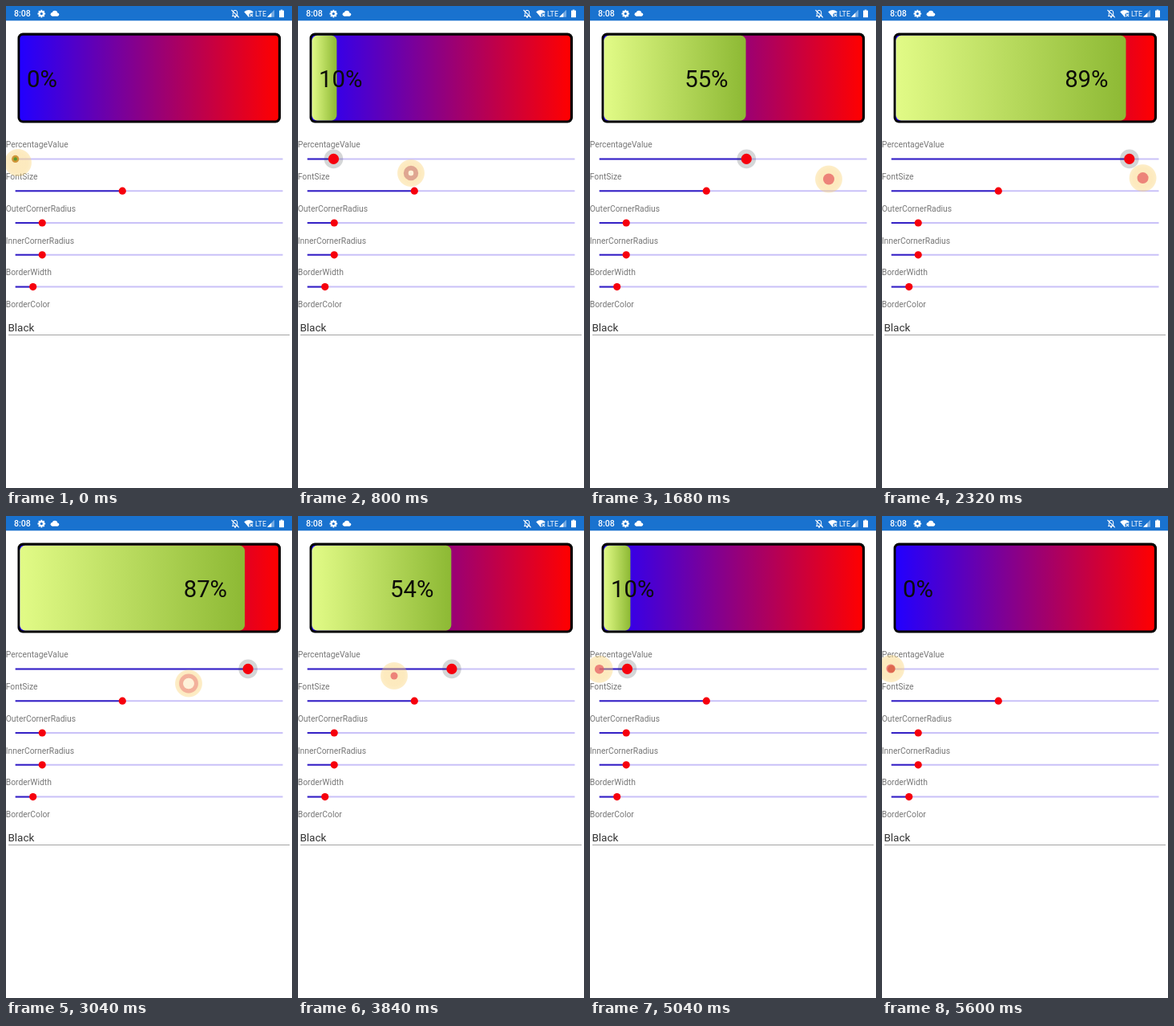
An HTML page with a canvas for the animation above (5680 ms loop, 357x600 px).

```html
<!DOCTYPE html>
<html lang="en">
<head>
<meta charset="utf-8">
<title>Progress bar demo</title>
<style>
html, body { margin: 0; width: 100%; height: 100%; overflow: hidden; background: #fff; }
canvas { display: block; width: 357px; height: 600px; }
</style>
</head>
<body>
<canvas id="stage" width="357" height="600"></canvas>
<script>
const ctx = document.getElementById('stage').getContext('2d');
const LOOP = 5680, STEP = 80, PULSE = 570;
const TRACK = { left: 11.7, right: 345.5 };
const FONT = 'Roboto, sans-serif';

// Keys: [time, value, ...]
const percentKeys = [[0, 0], [560, 0], [800, 9.8], [1360, 38.5], [1680, 55], [2240, 85],
  [2480, 97], [2600, 100], [2700, 100], [3040, 87], [3840, 54], [4560, 31], [5120, 7], [5360, 0]];
const touchKeys = [[0, 15, 195], [240, 44, 199], [800, 141, 208], [1680, 298, 215.5],
  [1920, 336, 216], [2060, 346, 216], [2180, 345, 215], [2490, 302, 213], [3040, 228, 208.5],
  [3840, 120, 199], [4560, 33.5, 196], [4800, 12, 191], [5600, 11, 190]];

function sample(keys, t, field = 1) {
  const next = keys.findIndex(key => key[0] > t);
  if (next < 0) return keys[keys.length - 1][field];
  const a = keys[next - 1], b = keys[next];
  return a[field] + (b[field] - a[field]) * (t - a[0]) / (b[0] - a[0]);
}

function circle(x, y, r, fill) {
  ctx.fillStyle = fill;
  ctx.beginPath();
  ctx.arc(x, y, r, 0, Math.PI * 2);
  ctx.fill();
}

function roundRect(x, y, w, h, r, fill) {
  ctx.fillStyle = fill;
  ctx.beginPath();
  ctx.roundRect(x, y, w, h, Math.min(r, w / 2));
  ctx.fill();
}

function polygon(fill, ...points) {
  ctx.fillStyle = fill;
  ctx.beginPath();
  points.forEach(([x, y]) => ctx.lineTo(x, y));
  ctx.fill();
}

function line(x1, y1, x2, y2, color, width) {
  ctx.strokeStyle = color;
  ctx.lineWidth = width;
  ctx.beginPath();
  ctx.moveTo(x1, y1);
  ctx.lineTo(x2, y2);
  ctx.stroke();
}

function text(string, x, y, size, color, weight = 400) {
  ctx.font = `${weight} ${size}px ${FONT}`;
  ctx.fillStyle = color;
  ctx.fillText(string, x, y);
}

function horizontal(x1, x2, from, to) {
  const gradient = ctx.createLinearGradient(x1, 0, x2, 0);
  gradient.addColorStop(0, from);
  gradient.addColorStop(1, to);
  return gradient;
}

function drawStatusBar() {
  const blue = '#1972cf';
  ctx.fillStyle = blue;
  ctx.fillRect(0, 0, 357, 18);
  ctx.fillStyle = '#a9c9ec';
  ctx.fillRect(0, 18, 357, 0.7);
  text('8:08', 10, 13.4, 10.6, '#fff', 500);

  for (let i = 0; i < 4; i++) {
    const dx = Math.cos(i * Math.PI / 4) * 4.8, dy = Math.sin(i * Math.PI / 4) * 4.8;
    line(44.3 - dx, 9.6 - dy, 44.3 + dx, 9.6 + dy, '#fff', 2);
  }
  circle(44.3, 9.6, 3.7, '#fff');
  circle(44.3, 9.6, 1.6, blue);

  circle(58, 10.3, 2.4, '#fff');
  circle(61, 9, 3.2, '#fff');
  circle(64.2, 10.6, 2.1, '#fff');
  ctx.fillRect(58, 10, 6.2, 2.7);

  // Muted bell
  ctx.strokeStyle = '#fff';
  ctx.lineWidth = 1;
  ctx.beginPath();
  ctx.moveTo(282, 12.5);
  ctx.lineTo(290, 12.5);
  ctx.moveTo(283.3, 12.5);
  ctx.lineTo(283.3, 8.5);
  ctx.arc(286, 8, 2.7, Math.PI, 0);
  ctx.lineTo(288.7, 12.5);
  ctx.stroke();
  circle(286, 14, 1, '#fff');
  line(281.5, 5, 290.8, 14.3, '#fff', 1.1);

  // Wi-Fi with a cross
  ctx.fillStyle = '#fff';
  ctx.beginPath();
  ctx.moveTo(303, 14);
  ctx.lineTo(297.2, 7.2);
  ctx.quadraticCurveTo(303, 2.8, 308.8, 7.2);
  ctx.fill();
  circle(306.3, 11.3, 2.9, blue);
  line(304.6, 9.6, 308.2, 13.2, '#fff', 1.1);
  line(308.2, 9.6, 304.6, 13.2, '#fff', 1.1);

  text('LTE', 311, 13.1, 8.9, '#fff');
  polygon('rgba(255,255,255,.4)', [326, 13.8], [335, 13.8], [335, 4.8]);
  polygon('#fff', [326, 13.8], [331.3, 13.8], [331.3, 8.5]);
  ctx.fillRect(341, 5.6, 6, 8.6);
  ctx.fillRect(342.7, 4.6, 2.6, 1.2);
}

function drawProgress(percent) {
  const label = Math.round(percent) + '%';
  const end = 16.7 + 3.234 * percent;
  roundRect(14.5, 33.5, 328.5, 112, 6.5, '#000');
  roundRect(17.3, 36.8, 322.6, 105.6, 4, horizontal(17, 340, '#2200ff', '#ff0000'));
  if (percent > 0.3) {
    roundRect(17.3, 36.8, end - 17.3, 105.6, 6.5, horizontal(17, end, '#e2fb87', '#8db934'));
  }
  ctx.font = `400 29.3px ${FONT}`;
  const x = Math.max(26, end - 22 - ctx.measureText(label).width);
  text(label, x, 100.8, 29.3, '#0c0c08');
}

function drawSlider(y, x, pressed, color = '#f6000d') {
  line(TRACK.left, y, TRACK.right, y, '#c9c1f8', 2);
  line(TRACK.left, y, x, y, '#3521c5', 2);
  if (pressed) circle(x, y, 11.8, 'rgba(60,70,75,.22)');
  circle(x, y, pressed ? 6.6 : 4.6, color);
}

function drawForm(percent, pressed) {
  const labels = ['PercentageValue', 'FontSize', 'OuterCornerRadius',
    'InnerCornerRadius', 'BorderWidth', 'BorderColor'];
  labels.forEach((label, i) => text(label, -0.3, 176.2 + i * 39.8, 10.35, '#777'));

  const valueX = TRACK.left + (TRACK.right - TRACK.left) * percent / 100;
  drawSlider(190.4, valueX, pressed, percent > 0 ? undefined : '#b06a14');
  [145.3, 45.2, 45.2, 33.7].forEach((x, i) => drawSlider(230.2 + i * 39.8, x, false));

  text('Black', 2.4, 404.6, 13.5, '#333');
  line(3, 409.5, 354, 409.5, '#a4a4a4', 1);
}

function drawTouch(t) {
  const x = sample(touchKeys, t), y = sample(touchKeys, t, 2);
  const phase = (t / PULSE + 0.463) % 1;
  const glow = ctx.createRadialGradient(x, y, 12, x, y, 17.5);
  glow.addColorStop(0, 'rgba(250,206,105,.43)');
  glow.addColorStop(0.8, 'rgba(250,210,115,.40)');
  glow.addColorStop(1, 'rgba(250,215,130,0)');
  circle(x, y, 17.5, glow);

  if (t < STEP) {
    circle(11.7, 190.4, 2.2, '#5c9a2a');
  } else if (phase < 0.6) {
    circle(x, y, Math.min(7, 2 + phase * 12.5), 'rgba(228,82,88,.68)');
  } else {
    const late = phase > 0.84;
    const outer = late ? 9.2 : 7 + (phase - 0.6) * 25;
    const hole = late ? 3.2 : (phase - 0.6) * 35;
    ctx.strokeStyle = late ? 'rgba(205,125,118,.62)' : 'rgba(238,150,140,.68)';
    ctx.lineWidth = outer - hole;
    ctx.beginPath();
    ctx.arc(x, y, (outer + hole) / 2, 0, Math.PI * 2);
    ctx.stroke();
    circle(x, y, hole, 'rgba(255,246,232,.65)');
  }
}

function draw(now) {
  const t = Math.floor(now % LOOP / STEP) * STEP;
  const percent = sample(percentKeys, t);
  ctx.fillStyle = '#fff';
  ctx.fillRect(0, 0, 357, 600);
  drawStatusBar();
  drawProgress(percent);
  drawForm(percent, t >= 480 && t < 5440);
  drawTouch(t);
}

let start;
function tick(now) {
  start ??= now;
  draw(Math.max(0, now - start));
  requestAnimationFrame(tick);
}
draw(0);
requestAnimationFrame(tick);
</script>
</body>
</html>
```
